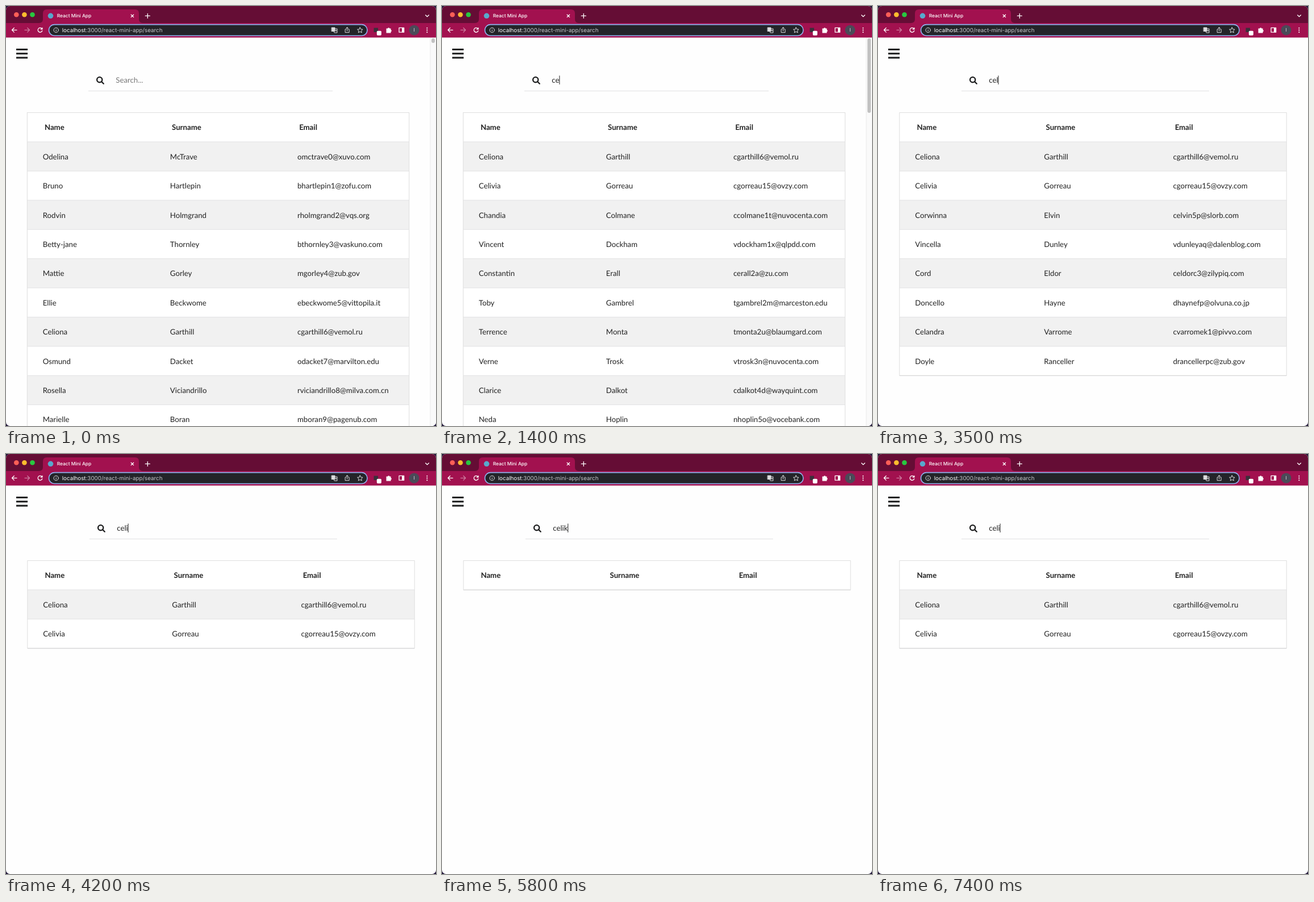
Recreate the animation shown at these times as an HTML page. Size 757 by 739 pixels, loop 8 s.

```html
<!DOCTYPE html>
<html lang="en">
<head>
<meta charset="utf-8">
<title>React Mini App</title>
<style>
html, body { margin: 0; width: 100%; height: 100%; overflow: hidden; background: #1d1236; }
svg { display: block; width: 757px; height: 739px; border-radius: 7px; background: #fefefe; }
text { text-rendering: geometricPrecision; white-space: pre; }
#page { font: 13.2px Lato, sans-serif; fill: #222; }
#bar { font: 9.8px Inter, sans-serif; fill: #fff; }
.line { fill: none; stroke: #fff; stroke-width: 1.3; stroke-linecap: round; stroke-linejoin: round; }
</style>
</head>
<body>
<svg viewBox="0 0 757 739">
  <g id="page"></g>
  <path d="M18 76.6H38.1M18 83.8H38.1M18 91H38.1" stroke="#1b1c1d" stroke-width="3"/>
  <g id="bar">
    <rect width="757" height="31" fill="#650d35"/>
    <rect y="30" width="757" height="25.5" fill="#a2114f"/>
    <path d="M58 30q7 0 7-7V13q0-7 7-7H227q7 0 7 7V23q0 7 7 7z" fill="#a2114f"/>
    <circle cx="18.3" cy="15.3" r="4.3" fill="#fe5f57"/>
    <circle cx="32.4" cy="15.3" r="4.3" fill="#febc2e"/>
    <circle cx="46.5" cy="15.3" r="4.3" fill="#28c840"/>
    <circle cx="78.5" cy="17.3" r="4.8" fill="#58a9cd"/>
    <text x="89.8" y="20.4" font-size="8.4" font-weight="500">React Mini App</text>
    <path class="line" d="M220.2 15.2l4.4 4.4M224.6 15.2l-4.4 4.4M249.3 13.4v8M245.3 17.4h8M738.6 16l2.9 2.8 2.9-2.8"/>
    <path class="line" d="M19 42.3H10.6M14.3 38.5l-3.8 3.8 3.8 3.8"/>
    <path class="line" stroke-opacity=".45" d="M33 42.3H41.4M37.7 38.5l3.8 3.8-3.8 3.8"/>
    <path class="line" d="M63.3 40.1a3.9 3.9 0 1 0 .5 3.4M63.9 38.3v2.6h-2.7"/>
    <rect x="75.5" y="32.6" width="560.5" height="19.6" rx="9.8" fill="#232429" stroke="#92b1ef" stroke-width="1.6"/>
    <g class="line" style="stroke:#dcdcde;stroke-width:1">
      <circle cx="88.2" cy="42.4" r="4.2"/>
      <path d="M88.2 42.2v2.2M88.2 40.3v.1"/>
      <path fill="#dcdcde" d="M573.5 38h5.5v6.5h-5.5z"/>
      <path d="M579 40h4v7h-5l-1-2.5M580 42.5h1.8M581 42.5v2"/>
      <path d="M598.6 41h-1.5v5.6h7V41h-1.5M600.6 44v-6.4M598.6 39.4l2-2 2 2"/>
      <path d="M623.3 37.7l1.4 3.1 3.4.4-2.5 2.3.7 3.4-3-1.7-3 1.7.7-3.4-2.5-2.3 3.4-.4z"/>
    </g>
    <text x="98.7" y="45.8">localhost<tspan fill="#c9c9cd">:3000/react-mini-app/search</tspan></text>
    <rect x="647.5" y="38.5" width="7.5" height="7.5" fill="#3b2f3a"/>
    <rect x="652.8" y="43.7" width="8" height="8" rx="1.6"/>
    <path d="M669.5 39.6h2.5a1.7 1.7 0 0 1 3.3 0h2.2v2.4a1.7 1.7 0 0 1 0 3.3v2.3h-8z"/>
    <rect class="line" x="692" y="38.4" width="8.6" height="7.8"/>
    <rect x="697" y="38.4" width="3.6" height="7.8"/>
    <circle cx="718.5" cy="42.4" r="9" fill="#4b4a58"/>
    <text x="718.5" y="45.4" font-size="8.5" text-anchor="middle" fill="#e4dfe8">I</text>
    <circle cx="741.3" cy="38.7" r="1.05"/>
    <circle cx="741.3" cy="42.4" r="1.05"/>
    <circle cx="741.3" cy="46.1" r="1.05"/>
  </g>
</svg>
<script>
const LOOP = 8000, ROW = 51.4, TOP = 187.6;

// first name, surname, record id, mail domain
const people = `Odelina McTrave 0 xuvo.com
Bruno Hartlepin 1 zofu.com
Rodvin Holmgrand 2 vqs.org
Betty-jane Thornley 3 vaskuno.com
Mattie Gorley 4 zub.gov
Ellie Beckwome 5 vittopila.it
Celiona Garthill 6 vemol.ru
Osmund Dacket 7 marvilton.edu
Rosella Viciandrillo 8 milva.com.cn
Marielle Boran 9 pagenub.com
Ivy Dorwath a q.co
Konrad Bilversen c nuv.gov
Celivia Gorreau 15 ovzy.com
Chandia Colmane 1t nuvocenta.com
Vincent Dockham 1x qlpdd.com
Constantin Erall 2a zu.com
Toby Gambrel 2m marceston.edu
Terrence Monta 2u blaumgard.com
Verne Trosk 3n nuvocenta.com
Clarice Dalkot 4d wayquint.com
Neda Hoplin 5o vocebank.com
Corwinna Elvin 5p slorb.com
Vincella Dunley aq dalenblog.com
Cord Eldor c3 zilypiq.com
Doncello Hayne fp olvuna.co.jp
Celandra Varrome k1 pivvo.com
Doyle Ranceller pc zub.gov`.split("\n").map(line => {
  const [first, last, id, domain] = line.split(" ");
  return [first, last, (first[0] + last).toLowerCase() + id + "@" + domain];
});

const typed = [[0, ""], [500, "c"], [1400, "ce"], [3500, "cel"], [4200, "celi"], [5800, "celik"], [7400, "celi"]];
const caretTimes = [500, 800, 1400, 1600, 2300, 2500, 3100, 3900, 4200, 4400, 5200, 5300, 5800, 6000, 6400, 7000, 7400];
const thumbs = { "": 8, c: 10, ce: 131 };

const page = document.getElementById("page");
const rect = (x, y, w, h, fill, extra = "") =>
  `<rect x="${x}" y="${y}" width="${w}" height="${h}" fill="${fill}" ${extra}/>`;
const text = (x, y, s, extra = "") => `<text x="${x}" y="${y}" ${extra}>${s}</text>`;

function table(x, w, rows) {
  const cells = (row, i, dx, extra) =>
    row.map((s, col) => text(x + dx + col * w / 3, TOP + ROW * i + 30.7, s, extra)).join("");
  const bottom = TOP + ROW * (rows.length + 1);
  let out = rect(x, TOP, w, bottom - TOP, "#fff") + cells(["Name", "Surname", "Email"], 0, 30.6, 'font-weight="700"');
  rows.forEach((row, i) => {
    const y = TOP + ROW * (i + 1);
    if (i % 2 == 0) out += rect(x, y, w, ROW, "#f1f1f1");
    out += rect(x, y - .5, w, 1, "#e2e2e3") + cells(row, i + 1, 27.4);
  });
  return out + rect(x, TOP, w, bottom - TOP, "none", 'stroke="#dedede"') + rect(x, bottom - .3, w, 1, "#d6d6d8");
}

function search(x, w, query, caret) {
  const cx = x + 19.8;
  return rect(x, 149, w, 1, "#e1e1e2") +
    `<g fill="none" stroke="#1b1c1d" stroke-width="2.3" stroke-linecap="round">
      <circle cx="${cx}" cy="129.7" r="4.6"/><path d="M${cx + 3.6} 133.3l3.5 3.5"/></g>` +
    text(x + 48.4, 135.2, query || "Search...", query ? 'id="query"' : 'fill="#777"') +
    (caret ? rect(0, 122.5, 1, 15.5, "#222", 'id="caret"') : "");
}

function render(query, caret) {
  const thumb = thumbs[query];
  const view = thumb ? 747 : 757;
  const x = view * .05, w = view * .9;
  const rows = people.filter(p => p.some(s => s.toLowerCase().includes(query))).slice(0, 10);
  const sx = x + w * .16;
  page.innerHTML = search(sx, w * .64, query, caret) + table(x, w, rows) +
    (thumb ? rect(747, 55, 10, 684, "#fafafa") + rect(746.5, 55, 1, 684, "#e9e9e9") +
      rect(749, 57, 6, thumb, "#c2c2c2", 'rx="3"') : "");
  if (caret) {
    const width = document.getElementById("query").getComputedTextLength();
    document.getElementById("caret").setAttribute("x", sx + 48.4 + width - .1);
  }
}

let shown;
function frame(now) {
  const t = now % LOOP;
  const query = typed.filter(([at]) => at <= t).pop()[1];
  const caret = caretTimes.filter(at => at <= t).length % 2;
  const key = query + caret;
  if (key != shown) render(query, caret);
  shown = key;
  requestAnimationFrame(frame);
}
frame(0);
</script>
</body>
</html>
```
